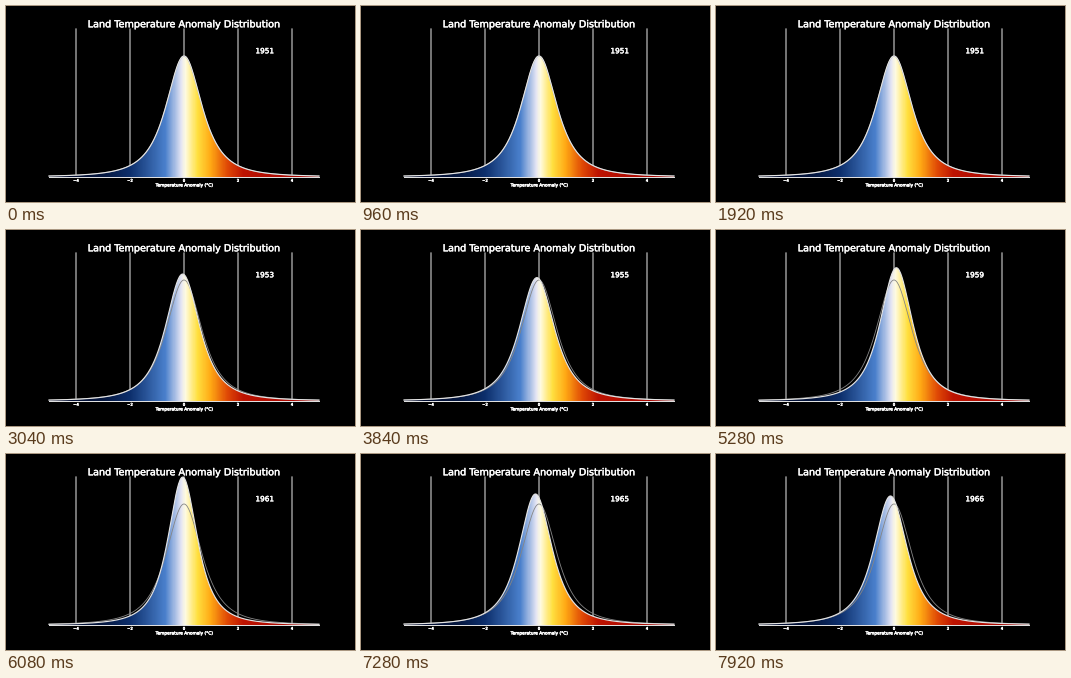
Recreate the animation shown at these times as a matplotlib script. Size 349 by 196 pixels, loop 8000 ms.

```python
import numpy as np
import matplotlib.pyplot as plt
from matplotlib.animation import FuncAnimation
from matplotlib.colors import LinearSegmentedColormap
from matplotlib.patches import Polygon
from matplotlib.patheffects import withStroke

W, H, DPI = 349, 196, 100
FRAMES, INTERVAL = 100, 80
ZERO, UNIT, TOP, BASE = 178, 27, 23, 171
LEFT, RIGHT = ZERO - 5 * UNIT, ZERO + 5 * UNIT
FIRST_YEAR, START_MS, YEAR_MS = 1951, 2057, 373
AREA = 124  # peak height times width stays constant

# Key points of the peak: year, height in pixels, anomaly in degrees
PEAKS = [
    (1951.0, 121, 0.00), (1953.6, 127, -.05), (1956.0, 123, -.08),
    (1957.7, 120, 0.21), (1961.8, 148, -.05), (1965.0, 131, -.13),
    (1966.7, 129, -.13),
]
COLOURS = [
    (-5, "#020a2c"), (-3, "#05173f"), (-2, "#0d2f6c"), (-.7, "#4a80cc"),
    (-.1, "#e4e5f4"), (.05, "#fffbe0"), (.5, "#ffe040"), (1, "#ffa814"),
    (1.6, "#e04a06"), (2.2, "#bd1402"), (5, "#a00000"),
]

anomaly = np.linspace(-5, 5, 401)
px = ZERO + UNIT * anomaly


def curve(height, centre):
    """Pixel rows of a heavy-tailed bell; a taller one is narrower."""
    offset = (anomaly - centre) * height / AREA
    return BASE - height * (1 + offset ** 2) ** -1.5


def peak_at(year):
    years, heights, centres = zip(*PEAKS)
    return np.interp(year, years, heights), np.interp(year, years, centres)


def outline(y):
    return np.vstack([[LEFT, BASE], np.column_stack([px, y]), [RIGHT, BASE]])


fig = plt.figure(figsize=(W / DPI, H / DPI), dpi=DPI, facecolor="black")
ax = fig.add_axes([0, 0, 1, 1])
ax.axis("off")


def label(x, y, text, size, stroke=.3):
    return ax.text(x, y, text, color="white", fontsize=size * 72 / DPI,
                   family="DejaVu Sans", ha="center", va="center", zorder=6,
                   path_effects=[withStroke(linewidth=stroke,
                                            foreground="white")])


label(ZERO, 18.3, "Land Temperature Anomaly Distribution", 9.65)
label(ZERO, 179.5, "Temperature Anomaly (°C)", 4.3)
year_text = label(258.7, 45.3, str(FIRST_YEAR), 7.3)

for tick in range(-4, 5, 2):
    x = ZERO + UNIT * tick
    ax.plot([x, x], [TOP, BASE], color="#b8b8b8", lw=.9, snap=False, zorder=1)
    label(x, 174.8, f"{tick}".replace("-", "\u2212"), 3.9)

cmap = LinearSegmentedColormap.from_list(
    "anomaly", [((a + 5) / 10, c) for a, c in COLOURS], N=512)
fill = ax.imshow(np.linspace(0, 1, 540)[None, :], cmap=cmap, aspect="auto",
                 extent=(LEFT, RIGHT, BASE, TOP), zorder=2)
ax.set_xlim(0, W)
ax.set_ylim(H, 0)

baseline = curve(*peak_at(FIRST_YEAR))
mask = Polygon(outline(baseline), closed=True, transform=ax.transData)
ax.plot(px, baseline, color="#858585", lw=.6, zorder=3)
ax.plot([LEFT, RIGHT], [BASE, BASE], color="#e8e8e8", lw=.7, zorder=4)
line, = ax.plot(px, baseline, color="#e4e4e4", lw=.85, zorder=5)


def update(frame):
    elapsed = max(0, frame * INTERVAL - START_MS)
    year = FIRST_YEAR + elapsed / YEAR_MS
    y = curve(*peak_at(year))
    line.set_ydata(y)
    mask.set_xy(outline(y))
    fill.set_clip_path(mask)
    year_text.set_text(str(int(year)))
    return line, fill, year_text


anim = FuncAnimation(fig, update, frames=FRAMES, interval=INTERVAL,
                     repeat=True, repeat_delay=0, blit=False)
plt.show()
```
